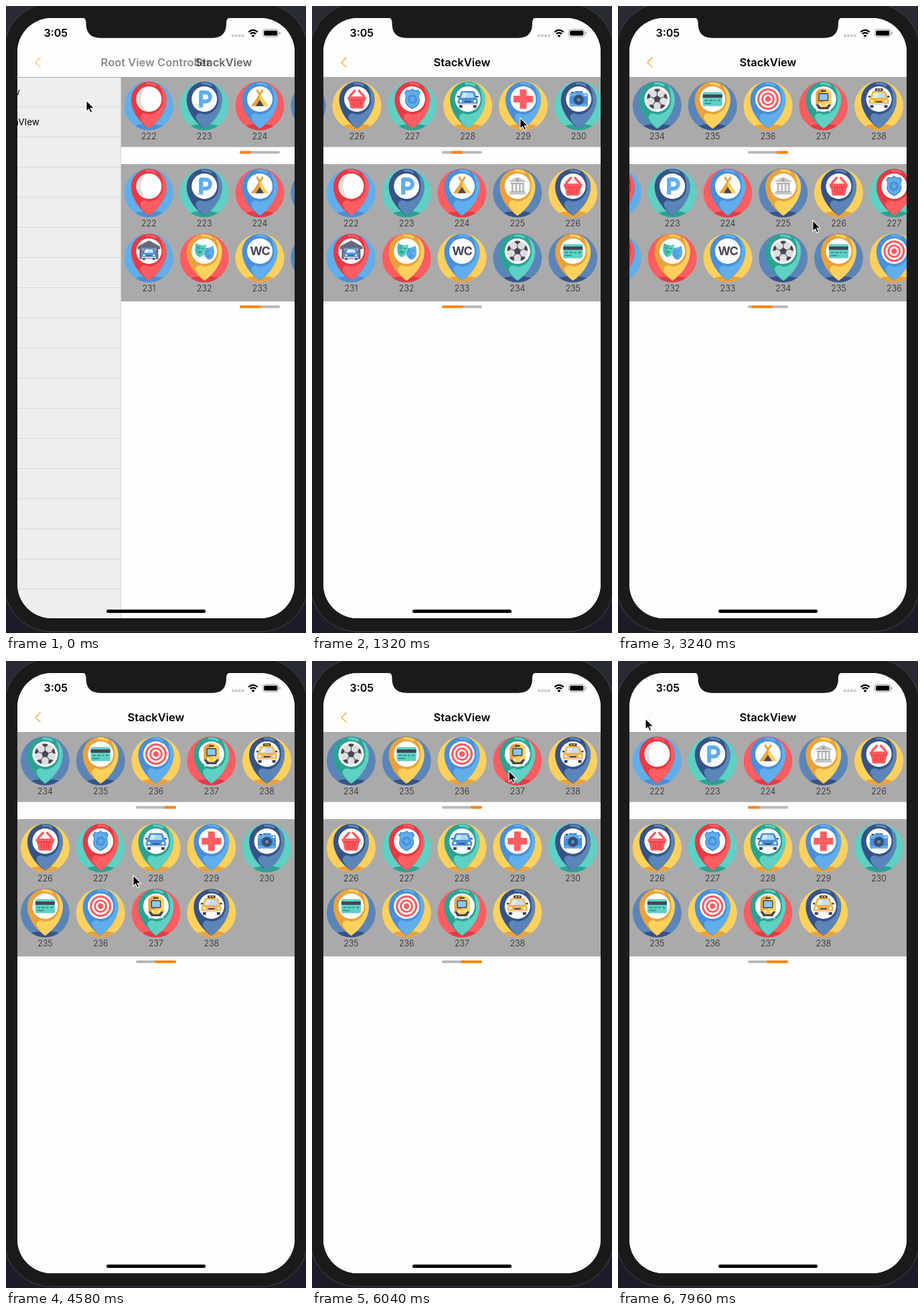
Animation of 448x936 px, one loop 8 s. Source, as an HTML page:

```html
<!DOCTYPE html>
<html lang="en">
<head>
<meta charset="utf-8">
<title>StackView</title>
<style>
  html, body { margin: 0; width: 100%; height: 100%; overflow: hidden; background: #282b33; }
  svg { display: block; width: 448px; height: 936px; }
  text { font-family: Inter, "Liberation Sans", sans-serif; }
  .title { font-size: 16.5px; font-weight: 600; text-anchor: middle; }
  .label { font-size: 12.4px; font-weight: 300; text-anchor: middle; fill: #222; }
  .row { font-size: 13.5px; text-anchor: end; }
</style>
</head>
<body>
<svg id="stage" viewBox="0 0 448 936"></svg>
<script>
const PITCH = 82.8, VIEW = 414, FIRST = 222, LOOP = 8000, STEP = 147;
const palette = { // [light, dark]
  b: ['#60aeeb', '#4a8fd9'],
  n: ['#5b85b8', '#365388'],
  t: ['#5ed0c4', '#2ba393'],
  r: ['#ff5d61', '#e63a45'],
  y: ['#ffd15c', '#eaa23c']
};
const [BLUE, DEEP] = palette.b, [TEAL, PINE] = palette.t, [RED, CRIMSON] = palette.r;
const [GOLD, AMBER] = palette.y, NAVY = palette.n[1], INK = '#464655';

const circle = (x, y, r, fill) => `<circle cx="${x}" cy="${y}" r="${r}" fill="${fill}"/>`;
const rect = (x, y, w, h, fill, rx = 0) => `<rect x="${x}" y="${y}" width="${w}" height="${h}" rx="${rx}" fill="${fill}"/>`;
const path = (d, fill) => `<path d="${d}" fill="${fill}"/>`;
const line = (d, color, w, cap = 'round') =>
  `<path d="${d}" fill="none" stroke="${color}" stroke-width="${w}" stroke-linecap="${cap}" stroke-linejoin="round"/>`;
const group = (body, attrs = '') => `<g ${attrs}>${body}</g>`;
const range = n => [...Array(n).keys()];
const polar = (r, a) => `${(r * Math.sin(a)).toFixed(2)},${(-r * Math.cos(a)).toFixed(2)}`;

// regular polygon, or a star when an inner radius is given
function polygon(n, r, fill, inner) {
  const count = inner ? 2 * n : n;
  const points = range(count).map(i => polar(inner && i % 2 ? inner : r, i * 2 * Math.PI / count));
  return path(`M${points.join('L')}Z`, fill);
}

const car = (body, dark, glass) =>
  rect(-13, 8, 5, 5, INK, 1) + rect(8, 8, 5, 5, INK, 1) +
  rect(-16, -5, 4, 2.5, dark, 1) + rect(12, -5, 4, 2.5, dark, 1) +
  path('M-8-12H8Q10-12 11-9L13-2Q15 0 15 3V8H-15V3Q-15 0-13-2L-11-9Q-10-12-8-12Z', body) +
  path('M-7.5-9.5H7.5L10-2H-10Z', glass) + path('M-7.5-9.5H0L-4-2H-10Z', '#fff7') +
  rect(-15, 6.5, 30, 2.5, '#e0e0e2', 1) + rect(-5, 3, 10, 2, dark, 1) +
  circle(-10.5, 3, 2, '#fff') + circle(10.5, 3, 2, '#fff');

const mask = (color, dark, mouth) =>
  path('M-8-9Q0-5 8-9V0Q7 9 0 11Q-7 9-8 0Z', color) + path('M-8-9Q-4-7 0-7V11Q-7 9-8 0Z', dark + '66') +
  line('M-5-2Q-3.5-4-2-2M2-2Q3.5-4 5-2', dark, 1.5) + path(mouth, dark);

const shield = 'M0-16Q3-12 9-14L12-9Q9-5 11 1Q12 10 0 15Q-12 10-11 1Q-9-5-12-9L-9-14Q-3-12 0-16Z';

const glyphs = {
  blank: path('M-3-18.2C-24-13-24 13-3 18.2C-15 9-15-9-3-18.2Z', '#e2e0de'),
  parking: line('M-5 12.5V-10H2A6.6 6.6 0 0 1 2 3.5H-5', BLUE, 6, 'butt'),
  tent: line('M-4.5-14L3-1M4.5-14L-3-1', AMBER, 3, 'butt') +
    path('M0-8L-13 10.5H0Z', AMBER) + path('M0-8L13 10.5H0Z', GOLD) + path('M0 1L-6 10.5H6Z', INK),
  bank: path('M0-14L12-8V-6H-12V-8Z', '#c6c6c8') + rect(-10, -5, 20, 2, '#aaaaae') +
    [-9, -3.5, 2, 7].map(x => rect(x, -3, 3, 11, '#bdbdc0')).join('') +
    rect(-11, 7.5, 22, 2, '#aaaaae') + rect(-12.5, 9.5, 25, 3, '#c6c6c8') + circle(0, -9, 2, '#98989d'),
  basket: line('M-10-5L-3-12.5M10-5L3-12.5', RED, 3.4) + rect(-14, -4, 28, 5, RED, 2.3) +
    path('M-12 1H12L10 12Q9.5 14 8 14H-8Q-9.5 14-10 12Z', RED) +
    line('M-12 1.6H12M-6 4L-5 11M-2 4V11M2 4V11M6 4L5 11', CRIMSON, 1.5),
  badge: path(shield, DEEP) + group(path(shield, BLUE), 'transform="scale(.86)"') +
    circle(0, 0, 7, DEEP) + polygon(5, 5.5, BLUE, 2.6),
  car: car(DEEP, NAVY, '#a9d7f7'),
  cross: rect(-14.5, -5, 29, 10, RED) + rect(-5, -14.5, 10, 29, RED),
  camera: rect(-6, -12, 12, 5, DEEP, 1) + rect(-13.5, -9, 27, 20, BLUE, 1.5) + rect(-13.5, -4, 27, 11, DEEP) +
    rect(-11, -11, 4, 2, INK) + circle(0, 1, 7.8, NAVY) + circle(0, 1, 5, INK) +
    circle(0, 1, 2.8, DEEP) + circle(10, -6, 1.3, '#fff'),
  garage: rect(-12, -6, 24, 18, '#a4a6b3') + line('M-12-4H12M-12-1H12', '#858796', 1) +
    path('M0-16L17-7V-3H14V12H11V-5H-11V12H-14V-3H-17V-7Z', '#68687a') +
    group(car(DEEP, NAVY, '#c9e6fb'), 'transform="translate(0 4) scale(.7)"'),
  masks: group(mask(BLUE, DEEP, 'M-3 6Q0 1 3 6Z'), 'transform="translate(7 2) rotate(-9)"') +
    group(mask(TEAL, PINE, 'M-4 2H4Q0 9-4 2Z'), 'transform="translate(-6 -2) rotate(7)"'),
  wc: `<text y="6.4" font-size="18" font-weight="700" text-anchor="middle" fill="${INK}" letter-spacing="-1">WC</text>`,
  ball: circle(0, 0, 15.5, '#dedee0') + polygon(5, 5.6, INK) +
    range(5).map(i => group(line('M0-5V-11', INK, 1) + path('M-4.5-14.8Q0-16.3 4.5-14.8L2-11H-2Z', INK),
      `transform="rotate(${i * 72})"`)).join(''),
  card: rect(-14.5, -10.5, 29, 21, TEAL, 1.5) + rect(-14.5, -7, 29, 5, INK) +
    line('M-12 2H-7M-5 2H0M2 2H5M8 2H12M-12 6.5H-2', '#28867f', 1.5, 'butt'),
  target: circle(0, 0, 16, RED) + circle(0, 0, 12.8, '#fff') + circle(0, 0, 10, RED) +
    circle(0, 0, 7, '#fff') + circle(0, 0, 4.2, RED),
  train: line('M-7 13L-10 18M7 13L10 18M-9 16.5H9', '#e8e8e8', 1.8) +
    path('M-11.5 8V-8Q-10-16 0-16Q10-16 11.5-8V8L7 14.5H-7Z', AMBER) +
    path('M0-16Q10-16 11.5-8V8L7 14.5H0Z', GOLD) + path('M-11.5 8H11.5L7 15H-7Z', INK) +
    path('M-7 5H7V9L4 12H-4L-7 9Z', GOLD) + rect(-7.5, -9, 15, 12, INK, 2) +
    rect(-6, -7.5, 12, 9, '#8bc7f1', 1) + rect(-4, -13.5, 8, 2.5, INK, 1) +
    circle(-5, 8, 1.5, '#fff') + circle(5, 8, 1.5, '#fff'),
  taxi: rect(-6, -16, 12, 4, INK, 1) + rect(-3, -15, 2, 2, GOLD) + rect(1, -15, 2, 2, GOLD) + car('#f5b546', INK, '#bfe3f8')
};

// background, pin, glyph
const places = ['br blank', 'tn parking', 'rb tent', 'ny bank', 'yn basket', 'tr badge', 'yt car', 'yb cross',
  'tn camera', 'br garage', 'ry masks', 'yb wc', 'nt ball', 'ny card', 'yb target', 'rt train', 'yn taxi'];

function pinIcon(spec, i) {
  const [[back, pin], glyph] = spec.split(' ');
  const [ground, shade] = palette[back], [light, dark] = palette[pin];
  return group(
    circle(0, 0, 36.5, ground) +
    group(`<ellipse cy="36" rx="28" ry="9" fill="${shade}"/>`, 'clip-path="url(#disc)"') +
    path('M0 34C-11 27-26.5 10-26.5-9.5A26.5 26.5 0 0 1 26.5-9.5C26.5 10 11 27 0 34Z', dark) +
    path('M15-31.2A26.5 26.5 0 0 1 26.5-9.5C26.5 10 11 27 0 34C-5 30-10 25-12.5 19C-14 12-7 9-1 13C12 13 22 3 21-10C21-20 18-27 15-31.2Z', light) +
    line('M-3-33.2Q5-34 10-30.5', light, 3) +
    circle(0, -10, 19, '#fdfdfd') +
    group(glyphs[glyph], 'transform="translate(0 -10)"'), `id="p${i}"`);
}

const strip = (from, to, y) => range(to - from).map(i => {
  const x = 58.4 + i * PITCH;
  return `<use href="#p${from + i}" x="${x}" y="${y}"/><text class="label" x="${x}" y="${y + 50}">${FIRST + from + i}</text>`;
}).join('');
const indicator = (id, y, w) => rect(194, y, 60, 4, '#b9b9bb', 2) +
  `<rect id="${id}" x="194" y="${y}" width="${w}" height="4" rx="2" fill="#ff8410"/>`;

const list = rect(-100, 107, 540, 810, '#eeeeee') +
  range(17).map(i => rect(-100, 150 + i * 45, 540, 1, '#d8d8d9')).join('') +
  '<text class="row" x="98.6" y="133">StackView</text><text class="row" x="127.6" y="178">CollectionVIew</text>';

const page = rect(16, 107, 1, 807, '#d8d8d8') + rect(17, 107, 414, 807, '#fefefd') +
  rect(17, 107, 414, 103.5, '#aaaaaa') + rect(17, 236, 414, 205, '#aaaaaa') +
  group(strip(0, 17, 149), 'id="top"') +
  group(strip(0, 9, 279) + strip(9, 17, 376), 'id="grid"') +
  indicator('topThumb', 216.5, 17.6) + indicator('gridThumb', 447, 32);

const statusBar = '<text x="56.5" y="46.3" font-size="16" font-weight="600">3:05</text>' +
  range(4).map(i => rect(337 + i * 5, 42.5, 3.8, 3.8, '#c9c9c9', 1)).join('') +
  line('M362.3 38.8Q369 33 375.7 38.8M364.8 41.7Q369 38.2 373.2 41.7', '#000', 2.3, 'butt') +
  path('M369 47L366.5 44Q369 42.2 371.5 44Z', '#000') +
  '<rect x="383.5" y="35" width="23.5" height="11" rx="3.2" fill="none" stroke="#999"/>' +
  rect(385.2, 36.7, 20.1, 7.6, '#000', 1.8) + path('M408.3 38.5Q410 39 410 40.5T408.3 42.5Z', '#999');

const screen =
  rect(17, 18, 414, 896, '#fefefd') + group(list, 'id="list"') + group(page, 'id="page"') +
  rect(17, 18, 414, 88, '#fefefd') + rect(17, 106, 414, 1, '#a6a6a6') +
  '<text id="oldTitle" class="title" x="223.5" y="90">Root View Controller</text>' +
  '<text id="newTitle" class="title" x="224" y="90">StackView</text>' +
  group(line('M51.2 77L44 84.2L51.2 91.4', '#f2a33a', 1.3), 'id="back"') +
  statusBar + rect(150, 901, 148, 5, '#000', 2.5) +
  path('M114 17Q119.5 18 119.5 25V26Q119.5 47.7 141 47.7H308Q329 47.7 329 26V25Q329 18 335 17Z', '#1a1a1b');

const stage = document.getElementById('stage');
stage.innerHTML = `<defs>
  <clipPath id="disc"><circle r="36.5"/></clipPath>
  <clipPath id="glass"><rect x="17" y="18" width="414" height="896" rx="51"/></clipPath>
  <linearGradient id="desk" x2="0" y2="1"><stop stop-color="#282b33"/><stop offset="1" stop-color="#1b1c28"/></linearGradient>
  ${places.map(pinIcon).join('')}</defs>` +
  rect(0, 0, 448, 936, 'url(#desk)') +
  '<rect x="-2.5" y="-4" width="453" height="938" rx="70" fill="#1a1a1b" stroke="#45464a"/>' +
  group(screen, 'clip-path="url(#glass)"') +
  '<path id="cursor" d="M0 0V16.2L3.7 12.8L6.2 18.4L8.8 17.2L6.3 11.7H11.5Z" fill="#000" stroke="#fff" stroke-width="1.1"/>';

// [time, ...values], straight between entries
const slideTrack = [[0, 155], [150, 45], [295, 10], [440, 0]];
const topTrack = [[590, 0], [740, 90], [880, 200], [1030, 275], [1320, 322], [1470, 350], [1620, 500], [1770, 740],
  [1920, 910], [2210, 993.6], [6340, 993.6], [6490, 870], [6630, 680], [6780, 500], [6930, 300], [7070, 140], [7220, 40], [7370, 0]];
const gridTrack = [[3100, 0], [3390, 130], [3540, 225], [3690, 295], [3980, 331.2], [4720, 331.2], [4860, 270],
  [5160, 80], [5400, 0], [5460, 0], [5600, 90], [5750, 250], [5870, 331.2]];
const cursorTrack = [[0, 120, 141], [440, 315, 166], [590, 315, 166], [880, 170, 167], [1320, 311, 167], [1470, 305, 167],
  [1770, 150, 167], [2360, 149, 167], [2950, 335, 320], [3100, 335, 320], [3540, 190, 320], [4580, 190, 320],
  [5160, 340, 322], [5450, 340, 322], [5750, 200, 300], [6020, 299, 164], [6190, 180, 165], [6340, 180, 165], [6780, 345, 165],
  [7220, 330, 165], [7660, 60, 95], [7930, 41, 86]];

function sample(track, t) {
  const next = track.findIndex(entry => entry[0] > t);
  if (next === 0) return track[0].slice(1);
  if (next < 0) return track[track.length - 1].slice(1);
  const a = track[next - 1], b = track[next], k = (t - a[0]) / (b[0] - a[0]);
  return a.slice(1).map((v, i) => v + (b[i + 1] - v) * k);
}

const $ = id => document.getElementById(id);
const move = (id, x, y = 0) => $(id).setAttribute('transform', `translate(${x.toFixed(2)} ${y.toFixed(2)})`);

function scroll(id, offset, columns, thumb) {
  move(id, -offset);
  move(id + 'Thumb', offset / ((columns - 5) * PITCH) * (60 - thumb));
}

function draw(now) {
  const t = Math.floor((now % LOOP + 5) / STEP) * STEP;
  const [slide] = sample(slideTrack, t), left = slide / 155;
  move('page', slide);
  move('list', -0.3 * (VIEW - slide));
  move('newTitle', 101 * left);
  $('newTitle').setAttribute('opacity', 1 - 0.4 * left);
  $('oldTitle').setAttribute('opacity', 0.45 * left);
  $('back').setAttribute('opacity', t > 7900 ? 0.15 : 1 - 0.3 * left);
  scroll('top', sample(topTrack, t)[0], 17, 17.6);
  scroll('grid', sample(gridTrack, t)[0], 9, 32);
  move('cursor', ...sample(cursorTrack, t));
}

const start = performance.now();
(function tick() {
  draw(performance.now() - start);
  requestAnimationFrame(tick);
})();
</script>
</body>
</html>
```
